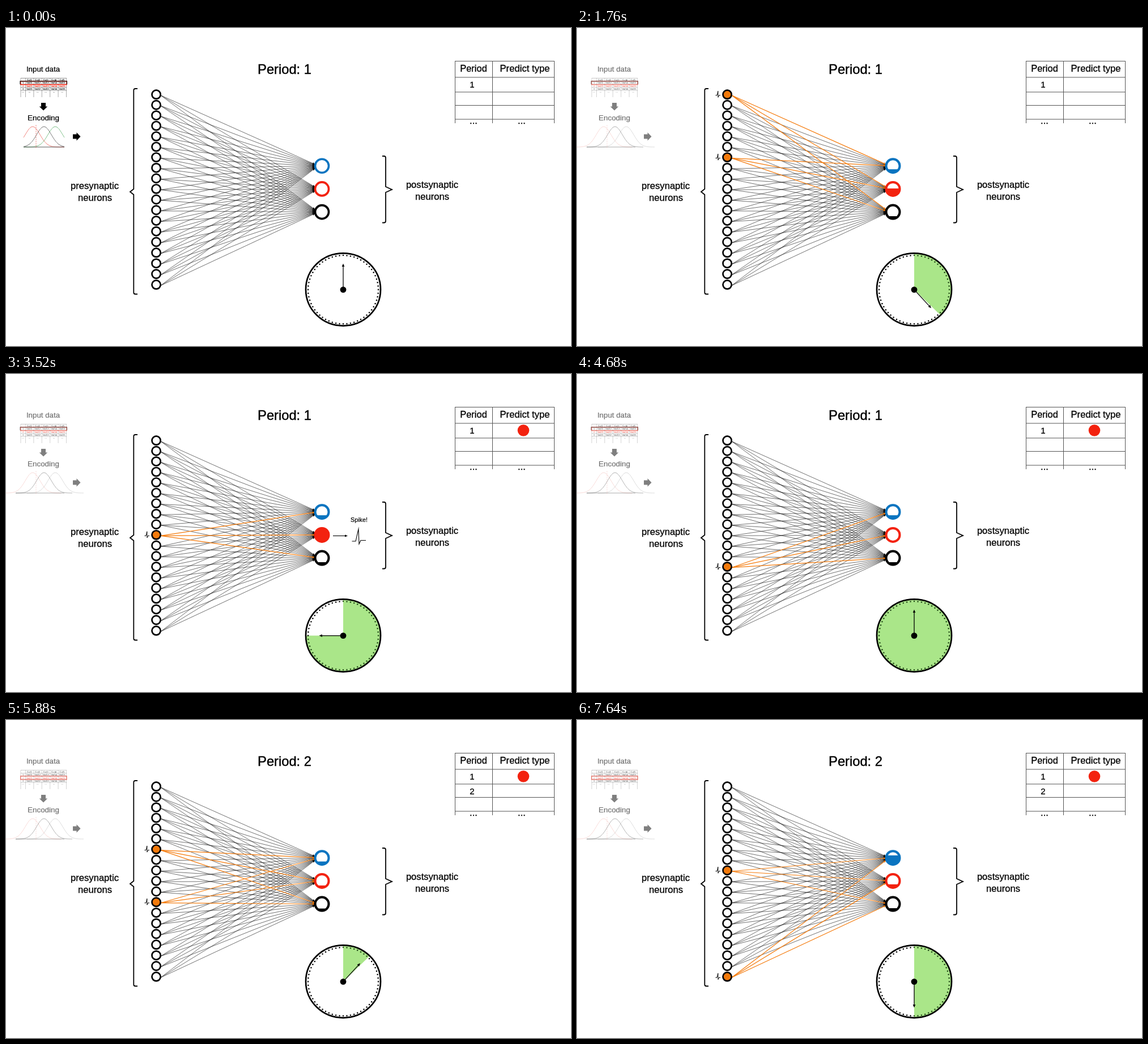
Write an HTML page with a canvas that moves like this. It is 997 by 561 pixels and loops after 8 s.

```html
<!DOCTYPE html>
<html lang="en">
<head>
<meta charset="utf-8">
<title>Spiking network</title>
<style>
html, body { margin: 0; width: 100%; height: 100%; overflow: hidden; background: #fff; }
canvas { display: block; }
</style>
</head>
<body>
<canvas id="stage" width="997" height="561"></canvas>
<script>
const ctx = document.getElementById('stage').getContext('2d');
const BLUE = '#0a74c0', RED = '#f3220f', ORANGE = '#f47a0b', GREEN = '#aae689';
const LOOP = 8000, TICK = 40, STEP_TICKS = 14.66, STEPS = 9, SPIKE_STEP = 6;
const INPUTS = 19, inputX = 265.1, outputX = 557.5;
const outputColors = [BLUE, RED, '#000'];
const winners = [RED, BLUE];

// Inputs that fire at each clock step, per period
const firings = [
  [[], [5, 18], [2, 11, 14], [1, 7], [16, 19], [3, 12], [10], [9, 15], [13]],
  [[], [7, 12], [13, 16], [11], [9, 19]]
];

const inputY = n => 117.3 + 18.64 * (n - 1) - 1.2 * Math.sin(Math.PI * (n - 1) / (INPUTS - 1));
const outputY = k => 243.2 + 40.7 * k;

function trace(points) {
  ctx.beginPath();
  points.forEach(([x, y]) => ctx.lineTo(x, y));
}

function line(points, color = '#000', width = 1) {
  trace(points);
  ctx.strokeStyle = color;
  ctx.lineWidth = width;
  ctx.stroke();
}

function shape(points, color) {
  trace(points);
  ctx.fillStyle = color;
  ctx.fill();
}

function circle(x, y, r, fill, stroke, width) {
  ctx.beginPath();
  ctx.arc(x, y, r, 0, 2 * Math.PI);
  ctx.fillStyle = fill;
  ctx.fill();
  if (!stroke) return;
  ctx.strokeStyle = stroke;
  ctx.lineWidth = width;
  ctx.stroke();
}

function text(str, x, y, size, color = '#000') {
  ctx.font = `${size}px "Liberation Sans", Arial, sans-serif`;
  ctx.textAlign = 'center';
  ctx.fillStyle = ctx.strokeStyle = color;
  ctx.lineWidth = size * .018;
  ctx.fillText(str, x, y);
  ctx.strokeText(str, x, y);
}

function arrow(x1, y1, x2, y2, color, width, head) {
  const a = Math.atan2(y2 - y1, x2 - x1), c = Math.cos(a), s = Math.sin(a);
  const bx = x2 - head * c, by = y2 - head * s, w = head * .42;
  line([[x1, y1], [bx, by]], color, width);
  shape([[x2, y2], [bx - w * s, by + w * c], [bx + w * s, by - w * c]], color);
}

function blockArrow(x, y, angle) {
  ctx.save();
  ctx.translate(x, y);
  ctx.rotate(angle);
  shape([[-6.5, -4], [0, -4], [0, -7.2], [7, 0], [0, 7.2], [0, 4], [-6.5, 4]], '#000');
  ctx.restore();
}

function brace(x, top, bottom, spine, tip, mid) {
  ctx.beginPath();
  ctx.moveTo(x, top);
  ctx.arcTo(spine, top, spine, mid, 3);
  ctx.lineTo(spine, mid - 5);
  ctx.lineTo(tip, mid);
  ctx.lineTo(spine, mid + 5);
  ctx.arcTo(spine, bottom, x, bottom, 3);
  ctx.lineTo(x, bottom);
  ctx.strokeStyle = '#000';
  ctx.lineWidth = 1.8;
  ctx.stroke();
}

function bell(peak, color, from, to) {
  const points = [];
  for (let x = from; x <= to; x++) points.push([x, 210 - 36 * Math.exp(-(((x - peak) / 13) ** 2) / 2)]);
  line(points, color, .8);
}

function drawDataTable(period) {
  for (let i = 0; i < 5; i++) line([[26, 88.5 + 5.4 * i], [107, 88.5 + 5.4 * i]], '#555', .6);
  line([[26, 88.5], [26, 122]], '#555', .5);
  for (let i = 0; i < 6; i++) line([[34.5 + 14.4 * i, 88.5], [34.5 + 14.4 * i, 122]], '#555', .5);
  for (let row = 0; row < 5; row++) {
    const y = 93 + row * 5.3, color = row === 2 ? RED : '#000';
    if (row) text(row < 4 ? row : '...', 30, y, 4, color);
    for (let col = 1; col < 6; col++) {
      const label = row === 0 ? 'Col' + col : row < 4 ? `Val${row}${col}` : '...';
      text(label, 27 + col * 14.4, y, 4.4, color);
    }
  }
  const top = 88.6 + 5.2 * period;
  ctx.strokeStyle = RED;
  ctx.lineWidth = 1.5;
  ctx.strokeRect(25.7, top, 81.4, 6);
  if (period === 1) line([[25, top + 5.4], [25, top], [107.5, top], [107.5, top + 5.4]], '#222', 1.2);
}

function drawInput(period, faded) {
  ctx.save();
  ctx.globalAlpha = faded ? .5 : 1;
  text('Input data', 65.5, 77, 13.3);
  text('Encoding', 66, 163, 13.4);
  drawDataTable(period);
  blockArrow(66, 138.5, Math.PI / 2);
  blockArrow(124.5, 191.5, 0);

  const reach = faded ? 50 : 100;
  const left = faded ? 0 : 31, right = faded ? 137 : 103;
  const colors = faded ? ['#f0a8a0', '#444', '#aaa'] : ['#ee625a', '#555', '#5fb06b'];
  colors.forEach((color, i) => {
    const peak = 47 + 20 * i;
    bell(peak, color, Math.max(left, peak - reach), Math.min(right, peak + reach));
  });
  line([[faded ? 17 : 31, 210], [103, 210]], '#444', .9);
  ctx.setLineDash([2, 1.5]);
  line([[53, 171], [53, 213]], colors[0], .8);
  ctx.restore();
}

function drawResults(period, predicted) {
  for (const y of [58.5, 87, 113, 136.5, 161]) line([[792, y], [968, y]], '#555');
  for (const x of [792.5, 858.5, 967.5]) line([[x, 58], [x, 168]], '#555');
  text('Period', 825, 76.5, 16.5);
  text('Predict type', 915.5, 76.5, 16.7);
  for (let p = 1; p <= period; p++) text(p, 822.5, 80 + 25.3 * p, 15);
  for (const x of [825, 910]) text('...', x, 169, 16.5);
  if (predicted) circle(913, 99.5, 10.3, RED);
}

function drawInputs(firing) {
  const numbers = Array.from({ length: INPUTS }, (_, i) => i + 1);
  const fires = n => firing.includes(n);
  numbers.sort((a, b) => fires(a) - fires(b));
  for (const n of numbers) {
    const y = inputY(n), on = fires(n);
    for (let k = 0; k < 3; k++) {
      arrow(273, y + 1.5, 545.5, outputY(k) + (y - outputY(k)) * .02, on ? ORANGE : '#111', on ? 1.2 : .6, 4.5);
    }
    circle(inputX, y, 7.6, on ? ORANGE : '#fff', '#000', 2.7);
    if (on) line([[244.5, y + 1.5], [247, y + 1.5], [248.8, y - 6], [249, y + 5], [250.5, y + 1.5], [253, y + 1.5]]);
  }
}

// The winner climbs until it spikes; the others settle at a low level.
function fillLevel(color, period, step) {
  if (color === winners[period - 1]) return step > SPIKE_STEP ? 0 : Math.min(1, .18 * step);
  return Math.min(color === '#000' ? .13 : .2, .1 * step);
}

function drawOutputs(period, step) {
  outputColors.forEach((color, k) => {
    const y = outputY(k), level = fillLevel(color, period, step);
    circle(outputX, y, 12, '#fff', color, step ? 4 : 3.6);
    if (!level) return;
    ctx.save();
    ctx.beginPath();
    ctx.arc(outputX, y, 11, 0, 2 * Math.PI);
    ctx.clip();
    ctx.fillStyle = color;
    ctx.fillRect(outputX - 12, y + 10 - 20 * level, 24, 24);
    ctx.restore();
  });
}

function drawSpike() {
  text('Spike!', 623, 261, 10.8);
  arrow(577, 285.5, 603, 285.5, '#000', 1.1, 5);
  line([[610.5, 295], [617, 295], [622, 273.5], [623, 300], [626, 293.5], [635, 293.5]], '#000', 1.1);
}

function drawClock(step) {
  const cx = 595, cy = 461.6, angle = step * Math.PI / 4;
  ctx.beginPath();
  ctx.moveTo(cx, cy);
  ctx.ellipse(cx, cy, 65.5, 63.5, 0, -Math.PI / 2, angle - Math.PI / 2);
  ctx.fillStyle = GREEN;
  ctx.fill();
  for (let i = 0; i < 60; i++) {
    const a = i * Math.PI / 30;
    circle(cx + 62 * Math.sin(a), cy - 60.5 * Math.cos(a), 1.25, a < angle ? '#234a18' : '#000');
  }
  ctx.beginPath();
  ctx.ellipse(cx, cy - .3, 66, 64, 0, 0, 2 * Math.PI);
  ctx.strokeStyle = '#000';
  ctx.lineWidth = 2.7;
  ctx.stroke();
  arrow(cx, cy, cx + 42.5 * Math.sin(angle), cy - 46 * Math.cos(angle), '#000', 1.3, 5.5);
  circle(cx, cy, 5.4, '#000');
}

function draw(now) {
  const tickIndex = Math.floor(now % LOOP / TICK);
  const count = Math.floor((tickIndex + .31) / STEP_TICKS);
  const period = 1 + Math.floor(count / STEPS), step = count % STEPS;
  ctx.fillStyle = '#fff';
  ctx.fillRect(0, 0, 997, 561);
  drawInput(period, step > 0);
  text('Period: ' + period, 491.5, 80.5, 23.7);
  drawResults(period, count >= SPIKE_STEP);
  text('presynaptic', 156.5, 284, 16.6);
  text('neurons', 157, 305, 16.6);
  text('postsynaptic', 752, 282, 16.6);
  text('neurons', 752, 303, 16.6);
  brace(232, 107, 469.5, 225.3, 219, 289);
  brace(664, 226, 343.5, 670, 681, 285);
  drawInputs(firings[period - 1][step]);
  drawOutputs(period, step);
  if (period === 1 && step === SPIKE_STEP) drawSpike();
  drawClock(step);
}

function tick() {
  draw(performance.now());
  requestAnimationFrame(tick);
}
tick();
</script>
</body>
</html>
```
